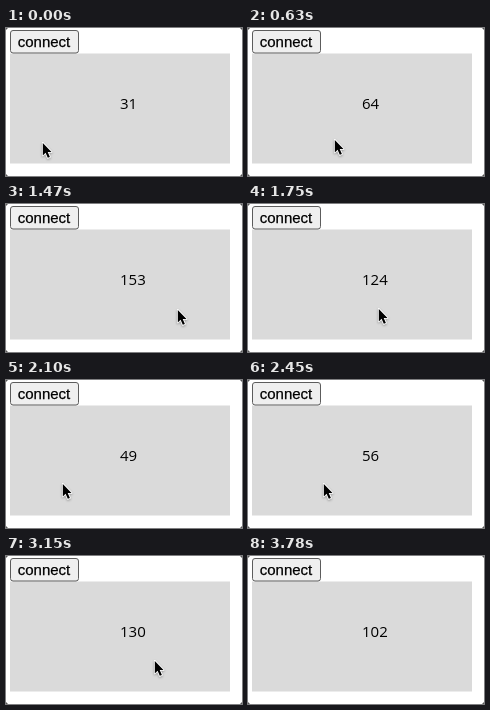
An HTML page that plays this animation: 236x148 px, repeating every 4130 ms.

```html
<!DOCTYPE html>
<html lang="en">
<head>
<meta charset="utf-8">
<title>Pointer position</title>
<style>
  html, body { margin: 0; width: 100%; height: 100%; overflow: hidden; background: #fff; }
  svg { display: block; width: 236px; height: 148px; }
  #label { font: 15px "Liberation Sans", Arial, sans-serif; stroke: #000; stroke-width: .25px; }
  #value { font: 15px "Open Sans", "Noto Sans", sans-serif; }
  #cursor { filter: drop-shadow(0 1px 1px rgba(0, 0, 0, .3)); }
</style>
</head>
<body>
<svg viewBox="0 0 236 148">
  <rect width="236" height="148" fill="#fff"/>
  <path d="M0 0h2L0 2zM236 0v2l-2-2zM0 148v-2l2 2zM236 148h-2l2-2z" fill="#555"/>
  <rect x="4" y="25.5" width="220" height="110" fill="#dadada"/>
  <rect x="4.5" y="2.5" width="68" height="22.5" rx="2.5" fill="#efefef" stroke="#5c5c5c"/>
  <text id="label" x="38" y="19" text-anchor="middle">connect</text>
  <text id="value" x="114" y="80.5"></text>
  <path id="cursor" d="M0 0V12.4L2.8 9.7 5 14.8 7.1 13.9 4.9 8.9H8.7Z"
    fill="#000" stroke="#fff" stroke-width="1.8" paint-order="stroke" stroke-linejoin="round"/>
</svg>
<script>
const LOOP = 4130, STEP = 70, END = 3780, LAG = 50, DROP = 3220;

// time and x of the horizontal sweeps
const keys = [
  [-140, 40], [140, 31], [280, 31], [420, 39], [630, 86], [840, 116],
  [1400, 173.5], [1680, 145], [1960, 70], [2030, 59], [2100, 56], [2240, 48],
  [2520, 88], [2660, 122], [2730, 127], [3150, 148], [DROP, 148], [3730, 116.8]
];

function slope(i) {
  const p = keys[i], q = keys[i + 1];
  return p && q ? (q[1] - p[1]) / (q[0] - p[0]) : 0;
}

// Harmonic mean keeps the curve from overshooting its keys
function tangent(i) {
  const a = slope(i - 1), b = slope(i);
  return a * b > 0 ? 2 * a * b / (a + b) : 0;
}

function xAt(t) {
  const next = keys.findIndex(k => k[0] > t);
  if (next < 0) return keys[keys.length - 1][1];
  const i = next - 1, [t0, x0] = keys[i], [t1, x1] = keys[next];
  const h = t1 - t0, u = (t - t0) / h, v = 1 - u;
  return x0 * v * v * (1 + 2 * u) + x1 * u * u * (3 - 2 * u)
    + h * u * v * (v * tangent(i) - u * tangent(next));
}

// Slow arc upwards, then an accelerating exit through the bottom
function yAt(t) {
  const arc = 108 + 5.5 * Math.cos(Math.PI * Math.min(t, 2730) / 2240);
  const fall = Math.max(0, t - DROP) / 420;
  return arc + 48 * fall * fall;
}

const cursor = document.getElementById("cursor");
const value = document.getElementById("value");

function draw(now) {
  const t = Math.min(END, Math.floor(now % LOOP / STEP) * STEP);
  const x = Math.round(xAt(t)) + 0.8, y = Math.round(yAt(t)) + 1;
  cursor.setAttribute("transform", `translate(${x} ${y})`);
  value.textContent = Math.round(0.9 * (xAt(t - LAG) - 3.5));
}

const start = performance.now();
function tick() {
  draw(performance.now() - start);
  requestAnimationFrame(tick);
}
tick();
</script>
</body>
</html>
```
